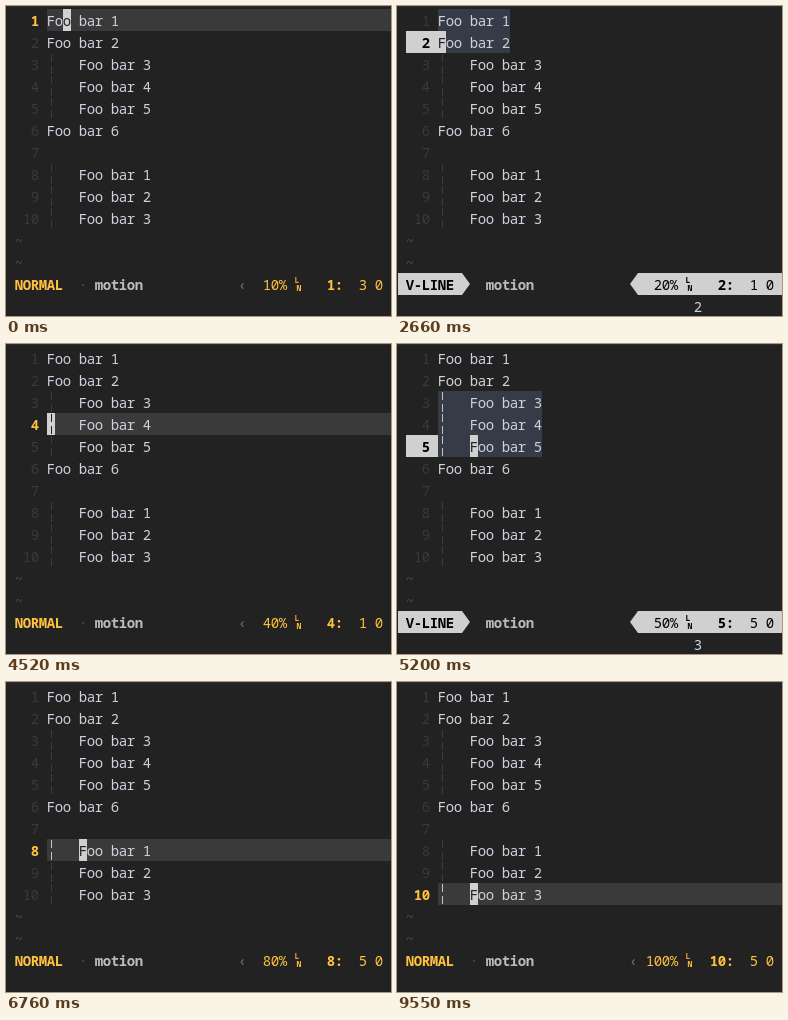
Animation, 385 px wide and 310 px high, one loop 9.78 s. Source, as an HTML page with a canvas:

```html
<!DOCTYPE html>
<html lang="en">
<head>
<meta charset="utf-8">
<title>Indent text object</title>
<style>
html, body { margin: 0; width: 100%; height: 100%; overflow: hidden; background: #222; }
canvas { display: block; }
</style>
</head>
<body>
<canvas id="stage" width="385" height="310"></canvas>
<script>
const ctx = document.getElementById('stage').getContext('2d', { alpha: false });
const LOOP = 9780, CW = 8, RH = 22, LEFT = 1, TOP = 3, TEXT = 5;
const W = 385, H = 310, STATUS = 12, CMD = 13;
const C = {
  bg: '#222222', line: '#3a3a3a', text: '#cdd3de', num: '#3a3a3a', tilde: '#4a4a4a',
  gold: '#ffc23d', block: '#d0d0d0', sel: '#363c47', ink: '#000000', file: '#bcbcbc',
  dim: '#505050', guide: '#4a3538', guideLit: '#c9c4bf', edge: '#2e2e2e'
};
const FACE = '"Noto Sans Mono", "DejaVu Sans Mono", monospace';

const lines = ['Foo bar 1', 'Foo bar 2', '    Foo bar 3', '    Foo bar 4', '    Foo bar 5',
  'Foo bar 6', '', '    Foo bar 1', '    Foo bar 2', '    Foo bar 3'];

// Each step: time, then the fields that change. sel: first selected row, 'v' for a bare visual cursor.
const steps = [
  [0, { row: 1, col: 3, sel: null, mode: 'NORMAL', cmd: '' }],
  [2250, { sel: 'v', cmd: '1' }],
  [2290, { mode: 'VISUAL' }],
  [2490, { cmd: 'i' }],
  [2620, { row: 2, col: 1, sel: 1, cmd: '2' }],
  [2660, { mode: 'V-LINE' }],
  [3800, { sel: null, cmd: '' }],
  [3840, { mode: 'NORMAL' }],
  [4300, { row: 3 }],
  [4480, { cmd: 'j' }],
  [4520, { row: 4, cmd: '' }],
  [4940, { sel: 'v', cmd: '1' }],
  [4980, { mode: 'VISUAL' }],
  [5070, { cmd: 'i' }],
  [5160, { row: 5, col: 5, sel: 3, cmd: '3' }],
  [5200, { mode: 'V-LINE' }],
  [5850, { cmd: '' }],
  [5890, { sel: null }],
  [5930, { mode: 'NORMAL' }],
  [6200, { cmd: 'j' }],
  [6240, { row: 6, cmd: '' }],
  [6580, { row: 7, col: 1 }],
  [6720, { cmd: 'j' }],
  [6760, { row: 8, col: 5, cmd: '' }],
  [7020, { sel: 'v', cmd: '1' }],
  [7060, { mode: 'VISUAL' }],
  [7150, { cmd: 'i' }],
  [7240, { row: 10, sel: 8, cmd: '3' }],
  [7280, { mode: 'V-LINE' }],
  [7900, { sel: null, cmd: '^[' }],
  [7940, { mode: 'NORMAL', cmd: '' }]
];
const hidden = [[410, 660], [1050, 1300], [1740, 1940], [3320, 3570], [8630, 8870], [9260, 9550]];

const cellX = c => LEFT + c * CW;
const rowY = r => TOP + r * RH;

function rect(x, y, w, h, color) {
  ctx.fillStyle = color;
  ctx.fillRect(x, y, w, h);
}

function cells(col, row, n, color) {
  rect(cellX(col), rowY(row), n * CW, RH, color);
}

function put(str, col, row, color, bold) {
  ctx.font = `${bold ? 'bold ' : ''}14px ${FACE}`;
  ctx.textAlign = 'center';
  ctx.fillStyle = color;
  [...str].forEach((ch, i) => {
    if (ch !== ' ') ctx.fillText(ch, cellX(col + i) + CW / 2, rowY(row) + 17);
  });
}

function arrow(x, dir, color) {
  const y = rowY(STATUS);
  ctx.fillStyle = color;
  ctx.beginPath();
  ctx.moveTo(x, y);
  ctx.lineTo(x + dir * CW, y + RH / 2);
  ctx.lineTo(x, y + RH);
  ctx.fill();
}

function drawLine(s, i, showCursor) {
  const n = i + 1, str = lines[i], here = n === s.row, visual = s.sel !== null;
  const picked = typeof s.sel === 'number' && n >= s.sel && n <= s.row;
  if (here && visual) cells(1, i, 4, C.block);
  if (here && !visual) rect(cellX(TEXT), rowY(i), W, RH, C.line);
  if (picked) cells(TEXT, i, str.length, C.sel);

  const numColor = !here ? C.num : visual ? C.ink : C.gold;
  put(String(n).padStart(2), 2, i, numColor, here);

  const at = TEXT + s.col - 1;
  if (here && visual) cells(at, i, 1, C.bg);
  if (here && showCursor) cells(at, i, 1, C.block);
  if (str[0] === ' ') {
    const under = here && showCursor && s.col === 1;
    const color = under ? C.bg : picked || (here && !visual) ? C.guideLit : C.guide;
    rect(45, rowY(i) + 1, 1, 8, color);
    rect(45, rowY(i) + 13, 1, 8, color);
  }
  put(str, TEXT, i, C.text);
  if (here && showCursor) {
    cells(at, i, str[0] === ' ' && s.col === 1 ? 0 : 1, C.block);
    put(str[s.col - 1] || ' ', at, i, C.bg);
  }
}

function drawStatus(s) {
  const normal = s.mode === 'NORMAL', ink = normal ? C.gold : C.ink;
  if (normal) {
    put('·', 9, STATUS, C.dim);
    put('‹', 28.9, STATUS, '#777');
  } else {
    cells(0, STATUS, 8, C.block);
    arrow(cellX(8), 1, C.block);
    cells(30, STATUS, 18, C.block);
    arrow(cellX(30), -1, C.block);
  }
  put(s.mode, 1, STATUS, ink, true);
  put('motion', 11, STATUS, C.file, true);
  put((s.row * 10 + '%').padStart(4), 31, STATUS, ink);
  ctx.font = `bold 8px ${FACE}`;
  ctx.fillStyle = normal ? '#ff9638' : ink;
  ctx.fillText('L', 291, rowY(STATUS) + 10);
  ctx.fillStyle = ink;
  ctx.fillText('N', 293, rowY(STATUS) + 18);
  put((s.row + ':').padStart(3), 39, STATUS, ink, true);
  put(s.col + ' 0', 44, STATUS, ink);
}

function draw(t) {
  const s = {};
  for (const [at, change] of steps) if (at <= t) Object.assign(s, change);
  const showCursor = !hidden.some(([a, b]) => t >= a && t < b);
  rect(0, 0, W, H, C.bg);
  rect(0, 0, W, 1, C.edge);
  lines.forEach((_, i) => drawLine(s, i, showCursor));
  put('~', 1, 10, C.tilde);
  put('~', 1, 11, C.tilde);
  drawStatus(s);
  put(s.cmd, 37, CMD, C.text);
}

let start = null;
function tick() {
  const now = performance.now();
  if (start === null) start = now;
  draw((now - start) % LOOP);
  requestAnimationFrame(tick);
}
tick();
</script>
</body>
</html>
```
